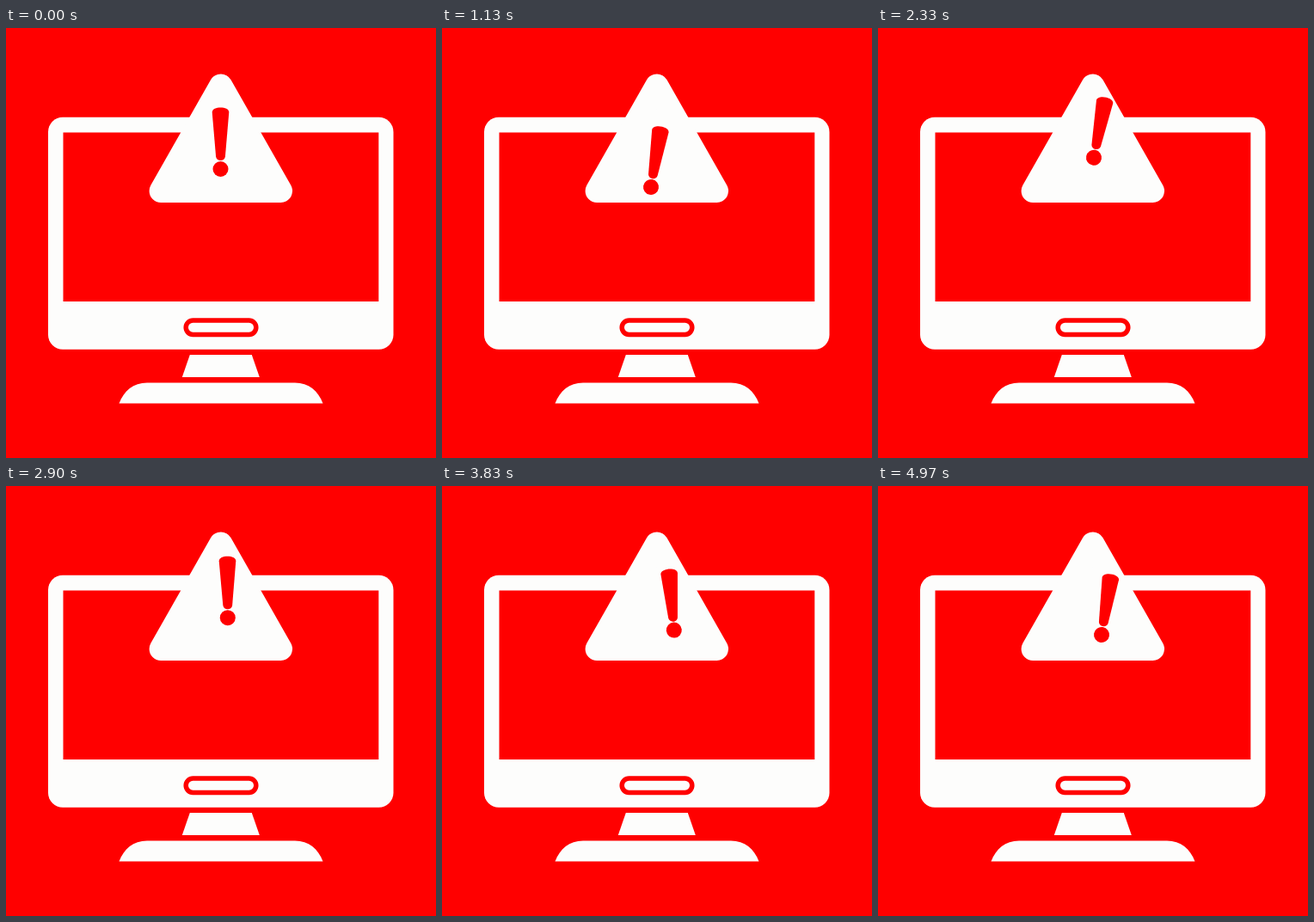
An HTML page with a canvas for the animation above (5010 ms loop, 500 by 500 pixels).

```html
<!DOCTYPE html>
<html lang="en">
<head>
<meta charset="utf-8">
<title>Computer warning</title>
<style>
html, body { margin: 0; width: 100%; height: 100%; overflow: hidden; background: #f00; }
canvas { display: block; width: 100vmin; height: 100vmin; margin: 0 auto; }
</style>
</head>
<body>
<canvas id="stage" width="500" height="500"></canvas>
<script>
const ctx = document.getElementById('stage').getContext('2d');
const RED = '#f00', WHITE = '#fdfdfc';
const LOOP = 5010, LAST = 149, MID = 249.8;

// Key poses of the wandering mark; steps run at 30 per second
const keys = [
  { step: 0, x: 249.5, y: 164, tilt: 0 },
  { step: 20, x: 223.5, y: 187, tilt: 7.5 },
  { step: 49, x: 266, y: 175.5, tilt: 10.5 },
  { step: 70, x: 251, y: 150.7, tilt: 11 },
  { step: 103, x: 266.5, y: 161, tilt: -9 },
  { step: 127, x: 269, y: 175, tilt: 2.5 },
  { step: 142, x: 252, y: 183, tilt: 7 },
  { step: LAST, x: 260, y: 173, tilt: 9 }
];

function slope(i, name) {
  const a = keys[Math.max(i - 1, 0)];
  const b = keys[Math.min(i + 1, keys.length - 1)];
  return (b[name] - a[name]) / (b.step - a.step);
}

// Smooth cubic curve through the key poses
function valueAt(step, name) {
  const i = Math.max(0, keys.findIndex(k => k.step >= step) - 1);
  const a = keys[i], b = keys[i + 1], d = b.step - a.step;
  const u = (step - a.step) / d, v = 1 - u;
  return v * v * (1 + 2 * u) * a[name] + u * u * (3 - 2 * u) * b[name] +
    d * u * v * (v * slope(i, name) - u * slope(i + 1, name));
}

function pill(x, y, w, h, r) {
  ctx.beginPath();
  ctx.roundRect(x, y, w, h, r);
}

// Symmetric four-sided shape around the middle line
function trapezoid(top, bottom, halfTop, halfBottom) {
  ctx.beginPath();
  ctx.moveTo(MID - halfTop, top);
  ctx.lineTo(MID + halfTop, top);
  ctx.lineTo(MID + halfBottom, bottom);
  ctx.lineTo(MID - halfBottom, bottom);
  ctx.closePath();
  ctx.fill();
}

function drawComputer() {
  ctx.fillStyle = WHITE;
  pill(49, 103.8, 401.5, 270, 17);
  ctx.fill();
  trapezoid(380, 406, 36, 45);

  ctx.beginPath();
  ctx.moveTo(131.5, 436.5);
  ctx.bezierCurveTo(137, 422, 148, 412.5, 164, 412.5);
  ctx.lineTo(336, 412.5);
  ctx.bezierCurveTo(352, 412.5, 363, 422, 368.5, 436.5);
  ctx.fill();

  ctx.fillStyle = ctx.strokeStyle = RED;
  ctx.fillRect(66.5, 121.5, 366.8, 196.5);
  ctx.lineWidth = 5.5;
  pill(209.2, 340, 81.6, 16.4, 8.2);
  ctx.stroke();
}

function drawTriangle() {
  ctx.fillStyle = ctx.strokeStyle = WHITE;
  ctx.lineWidth = 27;
  ctx.lineJoin = 'round';
  trapezoid(67, 189.5, 0, 69.7);
  ctx.stroke();
}

function drawMark(x, y, tilt) {
  ctx.save();
  ctx.translate(x, y);
  ctx.rotate(tilt * Math.PI / 180);
  ctx.fillStyle = RED;
  ctx.beginPath();
  ctx.arc(0, 0, 9, 0, Math.PI * 2);
  ctx.fill();
  ctx.beginPath();
  ctx.moveTo(-9.8, -66);
  ctx.bezierCurveTo(-9.8, -73.2, 9.8, -73.2, 9.8, -66);
  ctx.lineTo(5.4, -14.5);
  ctx.bezierCurveTo(4.6, -8.4, -4.6, -8.4, -5.4, -14.5);
  ctx.closePath();
  ctx.fill();
  ctx.restore();
}

function draw(now) {
  const t = now % LOOP;
  const step = Math.min(LAST, Math.floor((Math.floor(t / 10) + 0.5) * 0.3));
  ctx.fillStyle = RED;
  ctx.fillRect(0, 0, 500, 500);
  drawComputer();
  drawTriangle();
  drawMark(valueAt(step, 'x'), valueAt(step, 'y'), valueAt(step, 'tilt'));
}

const start = performance.now();
function tick() {
  draw(performance.now() - start);
  requestAnimationFrame(tick);
}
tick();
</script>
</body>
</html>
```
